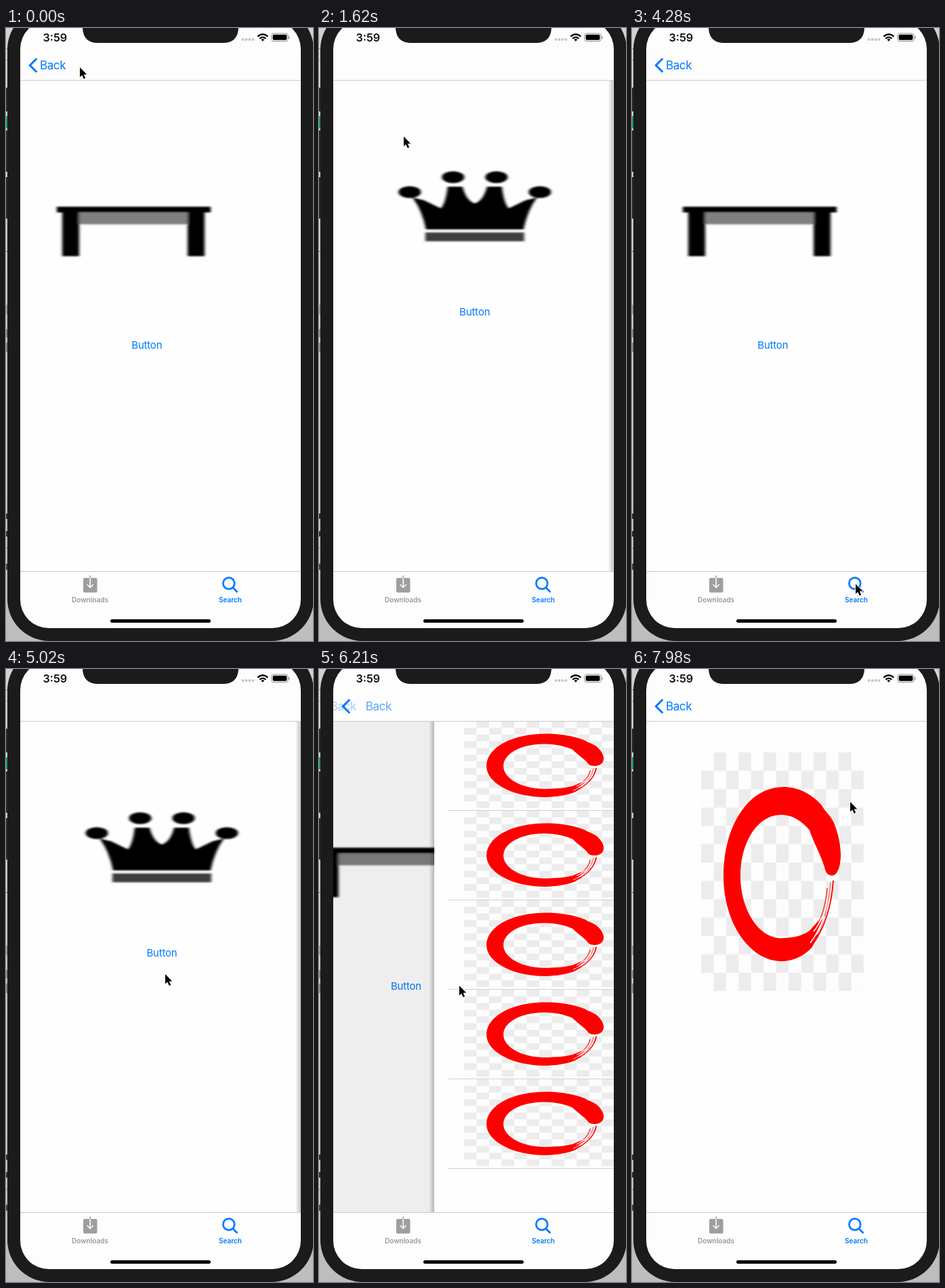
Recreate the animation shown at these times as an HTML page. Size 453 by 904 pixels, loop 8 s.

```html
<!DOCTYPE html>
<html lang="en">
<head>
<meta charset="utf-8">
<title>Phone navigation</title>
<style>
html, body { margin: 0; width: 100%; height: 100%; overflow: hidden; background: #c9c9c9; }
svg { display: block; width: 453px; height: 904px; font-family: Inter, Roboto, sans-serif; }
.blue { fill: #007aff; }
.btn { font-size: 15px; letter-spacing: -.2px; text-anchor: middle; }
.back { font-size: 17px; letter-spacing: -.4px; }
.tab { font-size: 10px; font-weight: 600; text-anchor: middle; }
</style>
</head>
<body>
<svg viewBox="0 0 453 904">
  <defs>
    <clipPath id="screen"><rect x="21" y="-11" width="414" height="896" rx="42"/></clipPath>
    <clipPath id="content"><rect x="21" y="77" width="414" height="725"/></clipPath>
    <filter id="soft" x="-10%" y="-10%" width="120%" height="120%"><feGaussianBlur stdDeviation="2 .9"/></filter>
    <linearGradient id="edge"><stop offset="0" stop-opacity="0"/><stop offset="1" stop-opacity=".24"/></linearGradient>
    <linearGradient id="desk" x2="0" y2="1"><stop offset="0" stop-color="#d2d2d2"/><stop offset="1" stop-color="#bdbdbd"/></linearGradient>
    <pattern id="check" width="36.923" height="54.154" patternUnits="userSpaceOnUse">
      <path fill="#ececec" d="M18.46 0h18.47v27.08h-18.47zM0 27.08h18.46v27.08H0z"/>
    </pattern>
    <g id="ring">
      <rect width="240" height="352" fill="#fdfdfd"/>
      <rect width="240" height="352" fill="url(#check)"/>
      <path fill="#f00" d="M190 181C200 185 206 170 206 150C205 128 200 114 196 104C191 93 182 86 178 78C160 58 140 51 121 51C70 51 33 108 33 182C33 252 72 308 119 308C137 308 152 300 164 287L174 266L167 272L181 243L169 260L174 247L160 263C147 272 132 274 118 274C85 274 58 232 58 182C58 130 85 92 118 92C135 92 150 102 160 115C164 128 178 155 182 169Q184 180 190 181Z"/>
      <g fill="none" stroke="#f00">
        <path stroke-width="1.8" d="M164 284C180 262 192 232 195 189"/>
        <path stroke-width="1.2" opacity=".6" d="M168 277C180 256 188 225 191 192"/>
        <path stroke-width="1.6" opacity=".8" d="M164 267C176 250 184 226 186 200"/>
      </g>
      <path fill="none" stroke="#fff" stroke-width="1.5" d="M161 281Q174 264 182 242M166 264Q173 256 178 243"/>
    </g>
  </defs>

  <rect width="453" height="904" fill="url(#desk)"/>
  <g id="strip"></g>
  <rect x="2" y="-30" width="452" height="934" rx="62" fill="#1b1b1b"/>

  <g clip-path="url(#screen)">
    <rect x="21" y="-11" width="414" height="896" fill="#fdfdfd"/>
    <g id="pages" clip-path="url(#content)"></g>
    <path stroke="#c9c9c9" d="M21 77.2H435M21 801.5H435"/>
    <path id="chevron" fill="none" stroke="#007aff" stroke-width="3" d="M45.3 45L35.3 55L45.3 65"/>
    <text id="backOld" class="back blue" y="61">Back</text>
    <text id="backNew" class="back blue" y="61">Back</text>

    <text x="54.5" y="19.8" font-size="16.2" font-weight="600" fill="#111">3:59</text>
    <g fill="#c6c6c6"><circle cx="349.5" cy="17" r="2"/><circle cx="354.5" cy="17" r="2"/><circle cx="359.5" cy="17" r="2"/><circle cx="364.5" cy="17" r="2"/></g>
    <g fill="none" stroke="#111" stroke-width="2.3">
      <path d="M371.3 12.6Q378.8 5.8 386.3 12.6M374.2 15.7Q378.8 11.6 383.4 15.7"/>
      <path stroke="none" fill="#111" d="M376.3 17Q378.8 15 381.3 17L378.8 19.7Z"/>
    </g>
    <rect x="391.8" y="8" width="24.4" height="11.6" rx="3.2" fill="#fff" stroke="#8d8d8d"/>
    <rect x="393.6" y="9.8" width="20.8" height="8" rx="1.8"/>
    <path d="M417.3 12v4q1.6-.6 1.6-2t-1.6-2" fill="#8d8d8d"/>

    <rect x="114" y="811" width="20.5" height="21.5" rx="2" fill="#9e9e9e"/>
    <path stroke="#9e9e9e" stroke-width="1.6" d="M124.2 807.5V811"/>
    <path fill="none" stroke="#fdfdfd" stroke-width="1.6" d="M124.2 811V825M119.6 820.5L124.2 825.2L128.8 820.5"/>
    <text class="tab" x="124" y="847.4" fill="#999">Downloads</text>
    <g fill="none" stroke="#007aff" stroke-width="2.7"><circle cx="328.8" cy="819" r="8.4"/><path d="M334.8 825.2L341.5 832"/></g>
    <text class="tab blue" x="331" y="847.4">Search</text>
    <rect x="154" y="872" width="148" height="5" rx="2.5"/>
  </g>
  <path fill="#1b1b1b" d="M113 -12V0Q114 22 136 22H320Q342 22 343 0V-12Z"/>

  <path id="cursor" stroke="#fff" stroke-width="1.6" paint-order="stroke" stroke-linejoin="round" d="M0 0V14.4L3.2 11.4L5.7 17L8.2 15.9L5.8 10.5H10.3Z"/>
</svg>

<script>
const $ = id => document.getElementById(id);
const LOOP = 8000, STEP = 147.6, WIDTH = 414, PARALLAX = 124;
const CROWN = 0, BENCH = 1, LIST = 2, DETAIL = 3;

const button = (id, x, y) => `<text id="${id}" class="btn blue" x="${x}" y="${y}">Button</text>`;
const ball = (x, y) => `<ellipse cx="${x}" cy="${y}" rx="16.5" ry="8.8"/>`;
const row = i => {
  const y = 77 + 132 * i;
  return `<use href="#ring" transform="translate(65 ${y}) scale(1 .3636)"/>
    <path stroke="#d2d2d2" d="M41 ${y + 131.5}H435"/>`;
};

const bodies = [
  `<g filter="url(#soft)">
    ${ball(134, 242)}${ball(198, 220)}${ball(262, 220)}${ball(326, 242)}
    <path d="M138 250L155 254L180 266Q187 258 190 234H212Q217 254 230 259Q243 254 248 234H270Q273 258 280 266L305 254L322 250Q308 268 302 297H158Q152 268 138 250Z"/>
    <rect x="157" y="301.5" width="146" height="13" fill="#403e40"/>
  </g>${button("crownBtn", 230, 423.5)}`,
  `<g filter="url(#soft)">
    <rect x="100" y="270" width="175" height="19.5" fill="#808080"/>
    <rect x="75" y="263.5" width="227" height="8.5"/>
    <path d="M83 270H108V336.5H83ZM268 270H293V336.5H268Z"/>
  </g>${button("benchBtn", 207.8, 472.5)}`,
  `<rect id="picked" x="21" y="77" width="414" height="131.5" fill="#d2d2d2"/>` + [0, 1, 2, 3, 4].map(row).join(""),
  `<use href="#ring" x="102" y="123"/>`
];

// Each page carries the dimming and shadow it casts to its left.
$("pages").innerHTML = bodies.map(b => `<g class="page">
  <rect class="dim" x="${21 - WIDTH}" y="77" width="${WIDTH}" height="725"/>
  <rect class="shade" x="13" y="77" width="8" height="725" fill="url(#edge)"/>
  <rect x="21" y="77" width="${WIDTH}" height="725" fill="#fefefe"/>${b}</g>`).join("");
const pages = [...document.querySelectorAll(".page")];

// Sliver of the desktop left of the phone: y, height, colour
$("strip").innerHTML = [
  [30, 1, "#888"], [47, 1, "#999"], [88, 35, "#2b2b2b"], [130, 18, "#13a06f"], [151, 61, "#2b2b2b"],
  [220, 61, "#2b2b2b"], [329, 1, "#555"], [408, 14, "#999"], [444, 12, "#888"], [464, 14, "#888"],
  [716, 8, "#333"], [742, 8, "#333"], [767, 1, "#777"], [790, 9, "#444"]
].map(([y, h, c]) => `<rect y="${y}" width="2.5" height="${h}" fill="${c}"/>`).join("");

// start, from, to, opacity of the back button when the move begins
const moves = [
  [-2000, CROWN, BENCH, 1],
  [1128, BENCH, CROWN, .42],
  [2850, CROWN, BENCH, 1],
  [4440, BENCH, CROWN, 1],
  [5176, CROWN, BENCH, 1],
  [6080, BENCH, LIST, 1],
  [7032, LIST, DETAIL, 1]
];

// step, x, y
const path = [
  [0, 109, 58], [1, 98, 56], [2, 78, 54], [3, 71, 53], [9, 71, 53], [11, 125, 160], [13, 225, 390],
  [14, 239, 426], [15, 232, 404], [24, 232, 404], [26, 270, 540], [28, 335, 834], [29, 330, 820],
  [30, 330, 820], [32, 300, 690], [34, 235, 450], [35, 229, 422], [37, 222, 440], [39, 208, 465],
  [42, 207, 467], [44, 270, 330], [46, 368, 150], [47, 378, 141], [48, 378, 141], [54, 322, 196]
];

const within = (t, a, b) => t >= a && t < b;
const fade = (id, v) => $(id).setAttribute("opacity", v);
const shift = (el, x, y = 0) => el.setAttribute("transform", `translate(${x} ${y})`);

// Critically damped spring: the share of the way still to go
const remaining = ms => {
  const x = ms * .01826;
  return x > 14 ? 0 : (1 + x) * Math.exp(-x);
};

function cursorAt(k) {
  const i = Math.max(1, path.findIndex(p => p[0] >= k));
  const [k0, x0, y0] = path[i - 1], [k1, x1, y1] = path[i];
  const f = (k - k0) / (k1 - k0);
  return [x0 + (x1 - x0) * f, y0 + (y1 - y0) * f];
}

function label(id, x, opacity) {
  $(id).setAttribute("x", 50 + x);
  fade(id, opacity);
}

function draw(time) {
  const k = Math.floor((time + 8) / STEP), t = k * STEP;
  const [start, from, to, base] = moves.filter(m => m[0] <= t).pop();
  const rem = remaining(t - start), done = 1 - rem;
  const push = to > from, upper = Math.max(from, to), lower = Math.min(from, to);
  const cover = push ? done : rem;

  pages.forEach((page, i) => {
    page.style.display = i === upper || i === lower ? "" : "none";
    shift(page, i === upper ? WIDTH * (1 - cover) : -PARALLAX * cover);
    page.querySelector(".dim").setAttribute("opacity", i === upper ? .1 * cover : 0);
    page.querySelector(".shade").setAttribute("opacity", i === upper ? Math.min(1, 3 * (1 - cover)) : 0);
  });

  if (push) {
    label("backOld", -52 * done, from === CROWN ? 0 : rem);
    label("backNew", 52 * rem, done);
    fade("chevron", from === CROWN ? done : 1);
  } else {
    label("backOld", 34 * done, base * rem);
    label("backNew", 0, 0);
    fade("chevron", base * rem * 1.15);
  }
  if (within(t, 1030, 1128)) {
    fade("backNew", .42);
    fade("chevron", .42);
  }

  fade("crownBtn", within(t, 2800, 2900) || within(t, 5160, 5300) ? .2 : 1);
  fade("benchBtn", within(t, 6045, 6195) ? .2 : 1);
  fade("picked", t > 6930 ? 1 : 0);
  shift($("cursor"), ...cursorAt(k));
}

function tick() {
  draw(performance.now() % LOOP);
  requestAnimationFrame(tick);
}
tick();
</script>
</body>
</html>
```
